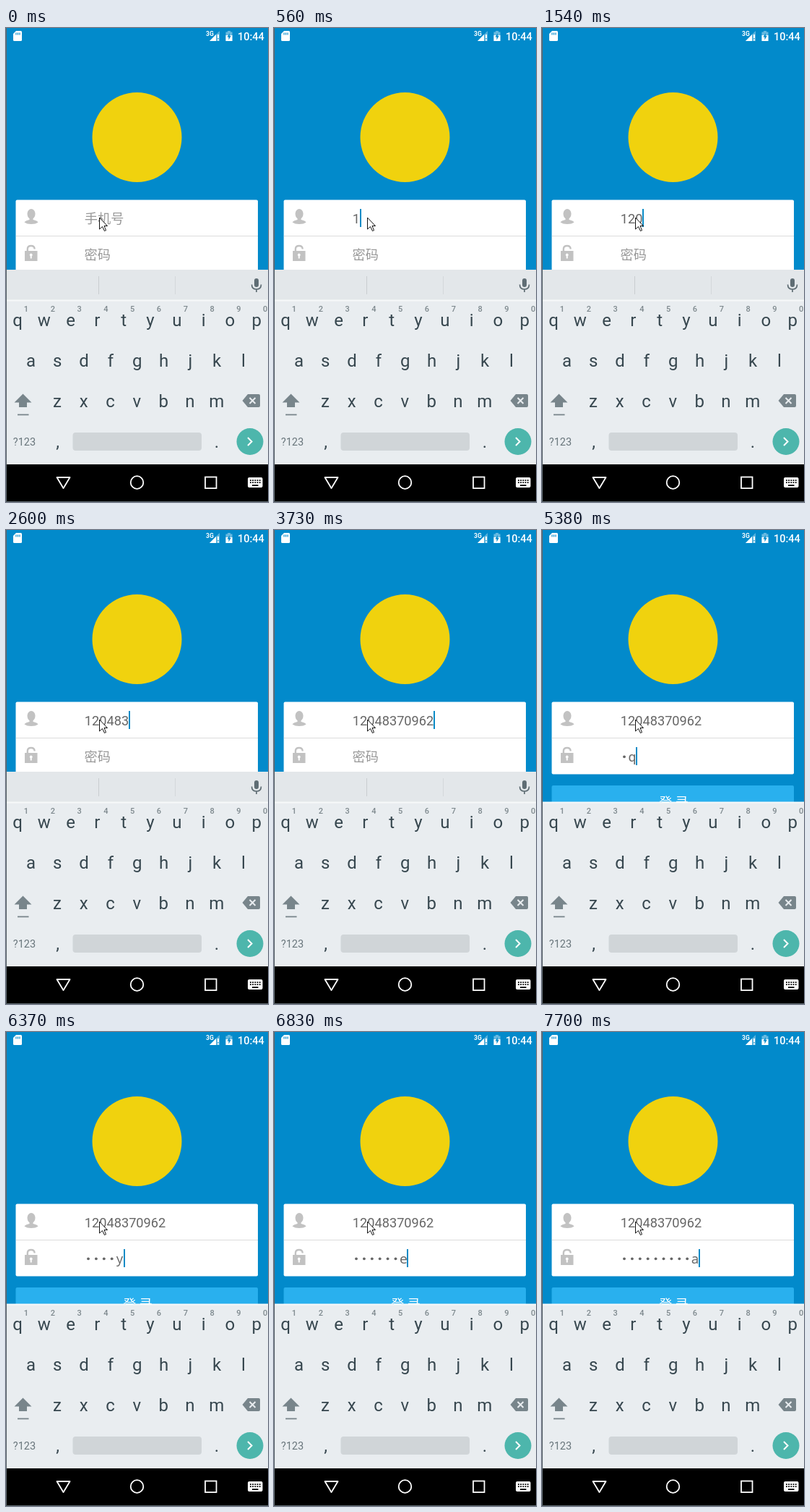
Write an HTML page that moves like this. It is 363x655 px and loops after 8 s.

```html
<!DOCTYPE html>
<html lang="zh-CN">
<head>
<meta charset="utf-8">
<title>Login typing</title>
<style>
  html, body { margin: 0; width: 100%; height: 100%; overflow: hidden; background: #028acb; }
  svg { display: block; width: 363px; height: 655px; font-family: Roboto, "Noto Sans CJK SC", "Noto Sans CJK", sans-serif; }
  .field { font-size: 18.2px; fill: #666; }
  .hint { font-size: 18.2px; fill: #999; }
  .mono { font-family: "Noto Sans Mono", monospace; }
  .key { font-size: 24px; fill: #37474f; text-anchor: middle; }
  .digit { font-size: 11px; font-weight: 500; fill: #7d888d; text-anchor: middle; }
</style>
</head>
<body>
<svg viewBox="0 0 363 655">
  <rect width="363" height="655" fill="#028acb"/>

  <!-- status bar -->
  <g fill="#fff">
    <path d="M14 4h6.5q1.5 0 1.5 1.5v11q0 1.5-1.5 1.5h-9q-1.500 0-1.5-1.5v-8.5z"/>
    <path d="M14 6.5v3M16.5 6.5v3M19 6.5v3" stroke="#028acb" stroke-width="1.2"/>
    <text x="277" y="11" font-size="8.5" font-weight="700">3G</text>
    <path d="M296 4v14h-14z" opacity=".35"/>
    <path d="M291 9v9h-9z"/>
    <path d="M293 9h2v5h-2zM293 15.5h2v2h-2z"/>
    <path d="M307 4h4v1.5h2.5v12.5h-9v-12.5h2.5z" opacity=".4"/>
    <path d="M304.500 10h9v8h-9z"/>
    <path d="M309.8 7l-3.300 5.500h2v4l3.300-5.800h-2z" fill="#028acb"/>
    <text x="321" y="17" font-size="14.5" font-weight="500">10:44</text>
  </g>

  <circle cx="181.5" cy="151" r="62" fill="#f0d20e"/>

  <!-- form -->
  <rect x="13.500" y="237.5" width="335.5" height="100" rx="2" fill="#fff"/>
  <path d="M14 287.5h335" stroke="#dcdcdc"/>
  <g fill="#c2c2c2">
    <ellipse cx="35" cy="257" rx="5.5" ry="7"/>
    <path d="M32.500 261h5v4q6 1.300 7 3.500q-3.500 2.500-9.500 2.500t-9.500-2.500q1-2.200 7-3.500z"/>
    <path d="M26 308h17.500v14h-17.500z"/>
    <path d="M29.800 309v-3.500q0-4.500 4.900-4.500t4.900 4.500" fill="none" stroke="#c2c2c2" stroke-width="2.400"/>
    <path d="M34.700 311.500a2 2 0 0 1 1 3.700v3.300h-2v-3.300a2 2 0 0 1 1-3.700z" fill="#fff"/>
  </g>
  <text id="phoneHint" class="hint" x="108.8" y="270">手机号</text>
  <text id="passHint" class="hint" x="108.5" y="320">密码</text>
  <text id="phone" class="field" x="108.8" y="270"></text>
  <g id="dots" fill="#666"></g>
  <text id="lastChar" class="field mono" y="320"></text>
  <rect id="caret" width="2" height="25" fill="#0a8bc6"/>

  <rect x="13.500" y="353" width="335.5" height="40" rx="2" fill="#29b0ee"/>
  <text x="182.5" y="383" font-size="18" font-weight="500" fill="#fff" text-anchor="middle">登 录</text>

  <!-- suggestion strip -->
  <g id="strip">
    <rect y="334" width="363" height="42" fill="#e3e7ea"/>
    <path d="M128.500 343v25" stroke="#c8cdd0"/>
    <path d="M234.500 343v25" stroke="#d3d8db"/>
    <rect x="344" y="346" width="6" height="12" rx="3" fill="#5f6d74"/>
    <path d="M340.500 354.500q0 6.500 6.500 6.500t6.500-6.500M347 361v4" fill="none" stroke="#5f6d74" stroke-width="1.700"/>
  </g>

  <!-- keyboard -->
  <rect y="376" width="363" height="228" fill="#e9edf0"/>
  <path d="M0 376.500h363" stroke="#f7f9fa" stroke-width="2"/>
  <g id="keys"></g>
  <g fill="#78858b">
    <path d="M23.500 505.500l12 12h-6.500v6.500h-11v-6.500h-6.500z"/>
    <path d="M16 533.500h15.500v1.800h-15.500z"/>
    <path d="M335 506h15q2 0 2 2v14q0 2-2 2h-15l-7.500-9z"/>
    <path d="M337.500 511l8 8M345.500 511l-8 8" stroke="#e9edf0" stroke-width="2"/>
    <text x="25.5" y="577" font-size="14.5" fill="#68757b" text-anchor="middle">?123</text>
  </g>
  <rect x="92.5" y="559" width="178.5" height="25" rx="4" fill="#d0d5d8"/>
  <circle cx="338" cy="571.5" r="18.5" fill="#4db6ac"/>
  <path d="M335 566l5.500 5.500-5.500 5.500" fill="none" stroke="#fff" stroke-width="2"/>

  <!-- navigation bar -->
  <rect y="603" width="363" height="52" fill="#000"/>
  <g fill="none" stroke="#fff" stroke-width="1.800">
    <path d="M70.500 621h18l-9 15z" stroke-linejoin="round"/>
    <circle cx="181.5" cy="628" r="8.8"/>
    <rect x="276" y="620.5" width="15.5" height="15.5"/>
  </g>
  <rect x="335" y="621" width="20.5" height="14" rx="2" fill="#fff"/>
  <path d="M338 625.200h15M338 628.200h15" stroke="#000" stroke-width="1.800" stroke-dasharray="1.8 1.4"/>
  <path d="M341 632h8.500" stroke="#000" stroke-width="1.800"/>

  <!-- window edge -->
  <path d="M.5 0v654.5h362.5" fill="none" stroke="#59656b"/>

  <!-- pointer -->
  <path d="M129.500 262v16l4-3.500 3 6 2-1-2.500-6h4.500z" fill="#fff" stroke="#111"/>
</svg>
<script>
const LOOP = 8000;
const PHONE = "12048370962";
const PASS = "wqgtymenha";
const PHONE_TIMES = [560, 1400, 1540, 1790, 2070, 2600, 2740, 3020, 3300, 3580, 3730];
const PASS_TIMES = [4820, 5380, 5660, 5800, 6370, 6680, 6830, 7260, 7540, 7700];
const FOCUS_PASS = 4290;
const BLINK = [1120, 1400];
const PHONE_STEP = 10.22, PASS_STEP = 10.9;

const el = id => document.getElementById(id);
const show = (node, on) => node.setAttribute("visibility", on ? "visible" : "hidden");

function add(parent, tag, attrs, text = "") {
  const node = document.createElementNS("http://www.w3.org/2000/svg", tag);
  for (const name in attrs) node.setAttribute(name, attrs[name]);
  node.textContent = text;
  parent.append(node);
  return node;
}

function keyRow(chars, x, y, cls = "key") {
  [...chars].forEach((c, i) => add(keys, "text", { x: x + i * 36.8, y, class: cls }, c));
}

const keys = el("keys");
keyRow("qwertyuiop", 16, 412);
keyRow("1234567890", 28, 392, "digit");
keyRow("asdfghjkl", 34.5, 468);
keyRow("zxcvbnm", 71, 524);
keyRow(",", 71.5, 580);
keyRow(".", 292, 580);

const dots = [...PASS].map((_, i) =>
  add(el("dots"), "circle", { cx: 114 + i * PASS_STEP, cy: 313.3, r: 1.9 }));

const caret = el("caret"), phone = el("phone"), lastChar = el("lastChar");
const typed = (times, t) => times.filter(at => at <= t).length;

function render(t) {
  const n = typed(PHONE_TIMES, t), m = typed(PASS_TIMES, t);
  const onPass = t >= FOCUS_PASS;

  phone.textContent = PHONE.slice(0, n);
  show(el("phoneHint"), n === 0);
  show(el("passHint"), m === 0);
  show(el("strip"), !onPass);

  dots.forEach((dot, i) => show(dot, i < m - 1));
  lastChar.textContent = m ? PASS[m - 1] : "";
  lastChar.setAttribute("x", 108.5 + (m - 1) * PASS_STEP);

  const blinkedOff = t >= BLINK[0] && t < BLINK[1];
  show(caret, (n > 0 || onPass) && !blinkedOff);
  caret.setAttribute("x", Math.round(onPass ? 108 + m * PASS_STEP : 108.8 + n * PHONE_STEP));
  caret.setAttribute("y", onPass ? 300 : 250);
}

const start = performance.now();
function tick() {
  render((performance.now() - start) % LOOP);
  requestAnimationFrame(tick);
}
tick();
</script>
</body>
</html>
```
